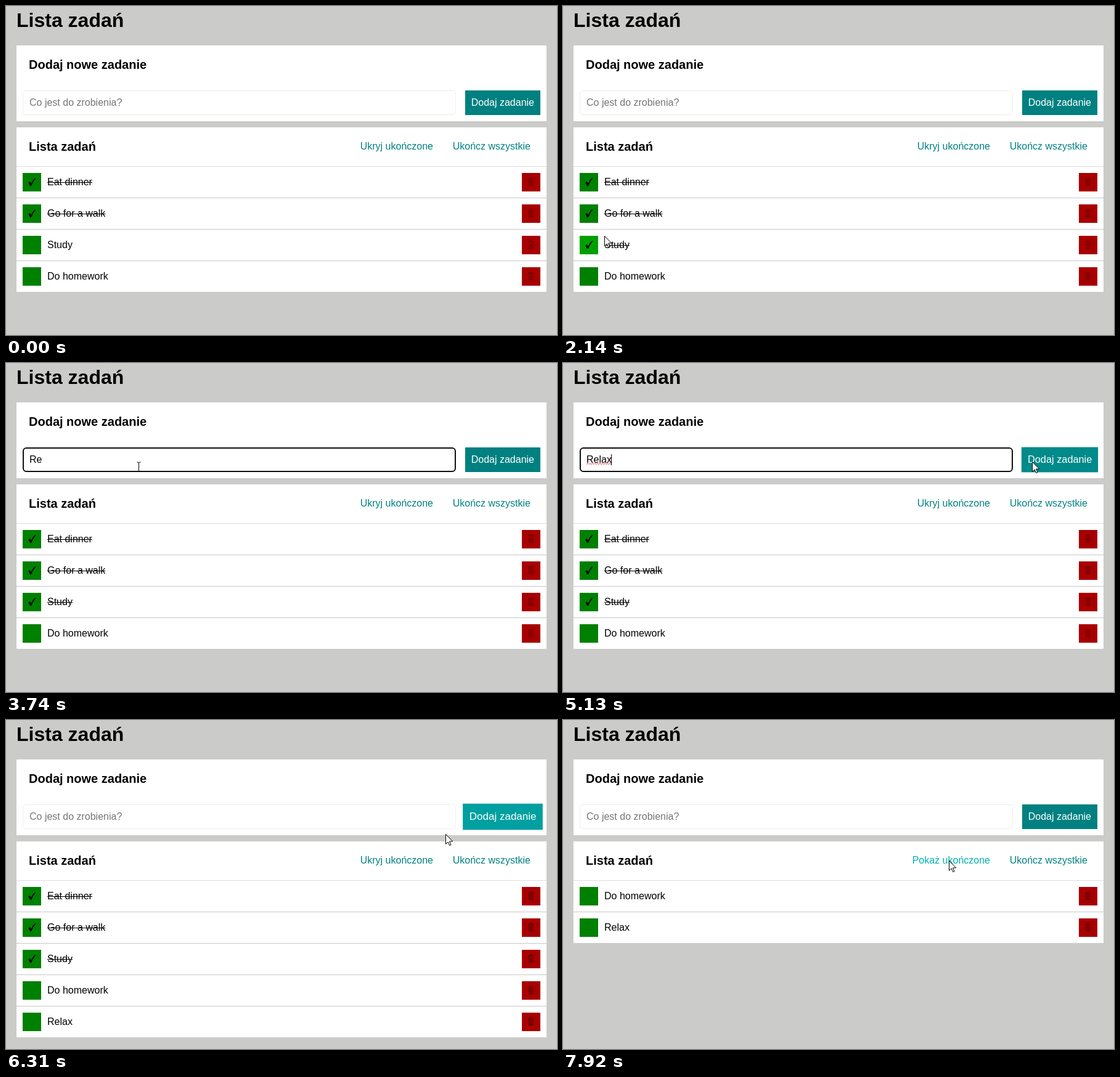
Animation, 894 px wide and 534 px high, one loop 7990 ms. Source, as an HTML page:

```html
<!DOCTYPE html>
<html lang="pl">
<head>
<meta charset="utf-8">
<title>Lista zadań</title>
<style>
  html, body { margin: 0; width: 100%; height: 100%; overflow: hidden; background: #cbcbca; }
  body { position: relative; font: 16px/18px "Liberation Sans", Arial, sans-serif; color: #000; }
  h1, h2, body div, body span, body svg { position: absolute; margin: 0; white-space: pre; }
  h1 { left: 17px; top: 5px; font-size: 32px; line-height: 37px; }
  h2 { left: 20px; top: 20px; font-size: 20px; line-height: 23px; }
  .panel { left: 17px; width: 860px; background: #fff; }
  #field { left: 27px; top: 137px; width: 703px; height: 40px; box-sizing: border-box;
    border: 1px solid #eee; border-radius: 5px; }
  #field.focused { border: 2px solid #101010; border-radius: 6px; }
  #entry { left: 38px; top: 148px; }
  #caret { top: 148px; width: 1px; height: 18px; background: #000; }
  #button { right: 27px; top: 137px; padding: 11px 10px; color: #fff; }
  .link { top: 219px; color: #008080; }
  .row { left: 17px; width: 860px; height: 50px; border-top: 1px solid #c8c8c8; }
  .row span { left: 50px; top: 16px; }
  .row svg { top: 10px; width: 30px; height: 30px; }
  .check { left: 10px; background: #008000; }
  .remove { right: 10px; background: #a80000; }
  .done { text-decoration: line-through; }
  .overlay { left: 0; top: 0; overflow: visible; }
</style>
</head>
<body>
<div id="stage" style="left:0;top:0;width:894px;height:534px">
  <h1>Lista zadań</h1>
  <div class="panel" style="top:64px;height:123px"><h2>Dodaj nowe zadanie</h2></div>
  <div id="field"></div>
  <span id="entry"></span>
  <svg class="overlay" width="1" height="1"><path id="squiggle" fill="none" stroke="#e33" stroke-width=".9"/></svg>
  <div id="caret"></div>
  <div id="button">Dodaj zadanie</div>

  <div class="panel" id="panel" style="top:197px"><h2>Lista zadań</h2></div>
  <span class="link" id="toggle" style="right:201px"></span>
  <span class="link" style="right:43px">Ukończ wszystkie</span>
  <div id="rows" style="left:0;top:260px;width:894px"></div>

  <svg class="overlay" width="1" height="1">
    <path id="arrow" d="M.5 .5V16.5L4.2 13L6.7 18.6L9 17.6L6.6 12H11.7Z" fill="#fff" stroke="#000"/>
    <path id="beam" d="M-3 -7.5H-1L0 -6.5L1 -7.5H3M0 -6.5V6.5M-3 7.5H-1L0 6.5L1 7.5H3" fill="none" stroke="#000"/>
  </svg>
</div>
<script>
const LOOP = 7990;
const CHECKED = 1250, FOCUSED = 3260, ADDED = 5550, HIDDEN = 7430;
const TYPED = [3400, 3600, 3820, 3960, 4100];
const WORD = "Relax";
const $ = id => document.getElementById(id);

// Pointer way-points: time, x, y
const PATH = [
  [130, 0, 474], [900, 43, 394], [1680, 43, 394], [2140, 67, 373], [2490, 123, 294],
  [3330, 215, 168], [3740, 215, 168], [4150, 228, 162], [4990, 725, 154], [5130, 761, 160],
  [5400, 776, 165], [5900, 776, 165], [6310, 713, 185], [6730, 664, 217], [7150, 645, 228],
  [7780, 645, 228], [7920, 626, 228]
];

const TASKS = ["Eat dinner", "Go for a walk", "Study", "Do homework", WORD];
$("rows").innerHTML = TASKS.map(task => `<div class="row">
  <svg class="check"><path d="M9.5 15.5L12 14L13.5 17.5Q16.5 11 20.5 8L21.4 8.6Q17 13.5 14 21H12.2Z"/></svg>
  <span>${task}</span>
  <svg class="remove"><path d="M10 9.5H19.5M13 8H16.5M11.5 10V20.5H18V10M13.7 11V20M15.9 11V20" fill="none" stroke="#4a0000"/></svg>
</div>`).join("");
const rows = [...$("rows").children];

let wave = "M38 164.5";
for (let x = 40; x <= 79; x += 2) wave += `L${x} ${x % 4 ? 164.5 : 162.8}`;
$("squiggle").setAttribute("d", wave);

const show = (el, on) => { el.style.display = on ? "" : "none"; };
const teal = tone => `rgb(0,${Math.round(tone)},${Math.round(tone)})`;

function ease(x) {
  x = Math.min(1, Math.max(0, x));
  return 1 - (1 - x ** 1.25) ** 2.8;
}
// Hover amount, fading in at "enter" and out at "leave"
const hover = (t, enter, leave, duration) =>
  ease((t - enter) / duration) * (1 - ease((t - leave) / duration));

function pointer(t) {
  const next = PATH.findIndex(p => p[0] > t);
  if (next < 1) return PATH[next ? PATH.length - 1 : 0].slice(1);
  const [t0, x0, y0] = PATH[next - 1], [t1, x1, y1] = PATH[next];
  const k = (t - t0) / (t1 - t0);
  return [x0 + (x1 - x0) * k, y0 + (y1 - y0) * k];
}

function drawForm(t) {
  const focused = t >= FOCUSED && t < ADDED;
  const typed = focused ? WORD.slice(0, TYPED.filter(time => t >= time).length) : "";
  $("field").className = focused ? "focused" : "";
  $("entry").textContent = typed || "Co jest do zrobienia?";
  $("entry").style.color = typed ? "#000" : "#757575";
  show($("squiggle"), typed === WORD);
  show($("caret"), focused && Math.floor((t - 4000) / 530) % 2 === 0);
  $("caret").style.left = 37 + (typed ? $("entry").offsetWidth : 0) + "px";

  const lift = hover(t, 5070, 6200, 500);
  $("button").style.transform = lift ? `scale(${1 + 0.1 * lift})` : "none";
  $("button").style.background = teal(128 + 51 * lift);
}

function drawList(t) {
  const hidden = t >= HIDDEN;
  let slot = 0;
  rows.forEach((row, i) => {
    const done = i < 2 || (i === 2 && t >= CHECKED);
    const visible = !(hidden && done) && (i < 4 || t >= ADDED);
    show(row, visible);
    if (!visible) return;
    const [check, label, remove] = row.children;
    row.style.top = 51 * slot + "px";
    row.style.borderColor = slot ? "#c8c8c8" : "#ddd";
    label.className = done ? "done" : "";
    show(check.firstChild, done);
    if (i === 2) check.style.background = `rgb(0,${Math.round(128 + 51 * hover(t, 1230, 2050, 400))},0)`;
    remove.firstChild.style.opacity = t < ADDED ? 0.6 : 0.85;
    slot++;
  });
  $("panel").style.height = 63 + 51 * slot + "px";
  $("toggle").textContent = hidden ? "Pokaż ukończone" : "Ukryj ukończone";
  $("toggle").style.color = teal(128 + 48 * ease((t - 6850) / 300));
}

function drawPointer(t) {
  const [x, y] = pointer(t).map(Math.round);
  const overField = x >= 27 && x < 730 && y >= 137 && y < 177;
  show($("arrow"), t >= 130 && !overField);
  show($("beam"), t >= 130 && overField);
  $("arrow").setAttribute("transform", `translate(${x} ${y})`);
  $("beam").setAttribute("transform", `translate(${x + 0.5} ${y + 0.5})`);
}

const start = performance.now();
function frame() {
  const t = (performance.now() - start) % LOOP;
  drawForm(t);
  drawList(t);
  drawPointer(t);
  requestAnimationFrame(frame);
}
frame();
</script>
</body>
</html>
```
